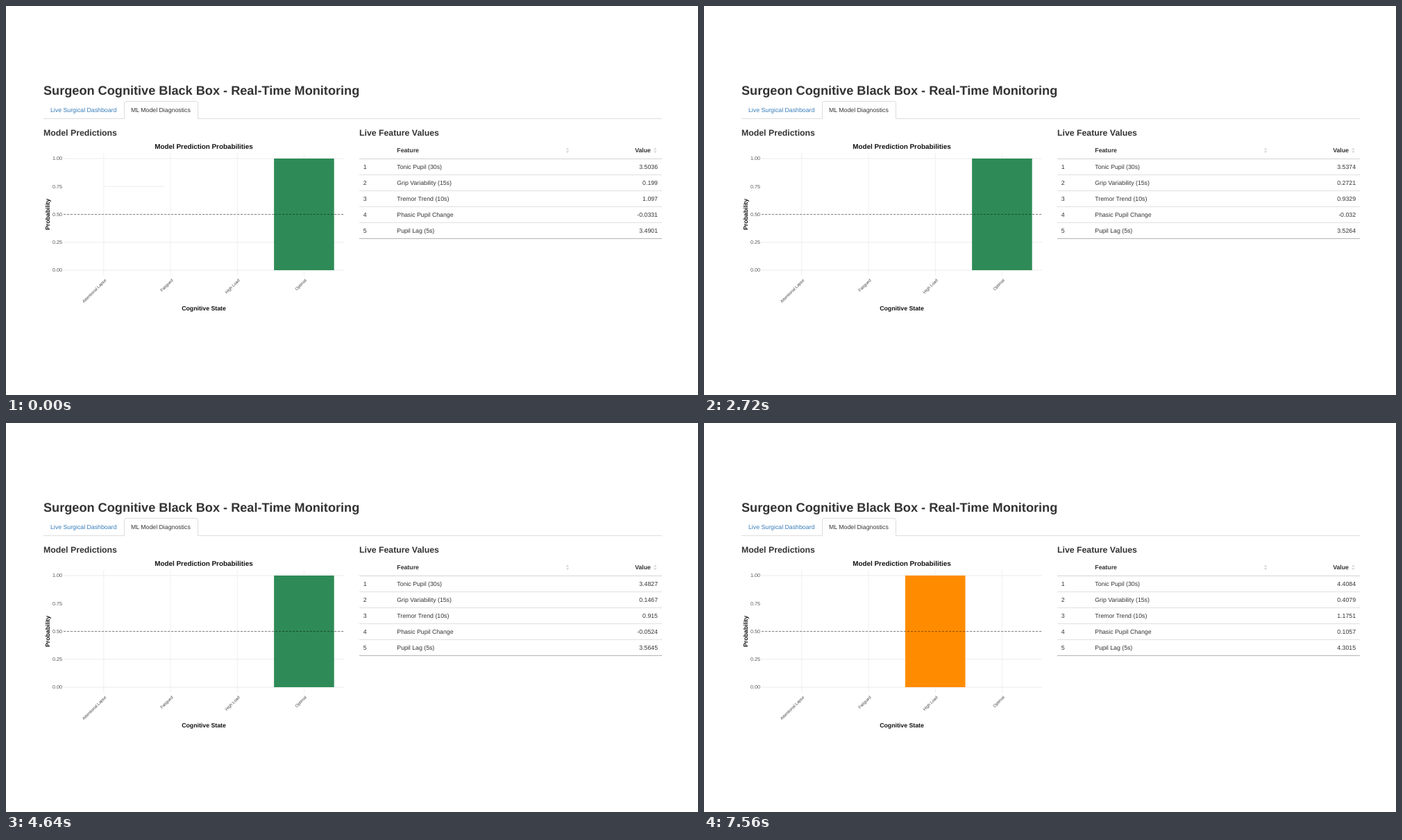
These frames come from a looping animation (997 by 561 pixels, 8000 ms). An HTML page:

```html
<!DOCTYPE html>
<html lang="en">
<head>
<meta charset="utf-8">
<title>Real-Time Monitoring</title>
<style>
  html, body { margin: 0; width: 100%; height: 100%; overflow: hidden; background: #fff; }
  svg { display: block; width: 997px; height: 561px; }
  text { font: 8.75px "Liberation Sans", Arial, sans-serif; fill: #333; text-rendering: geometricPrecision; }
  .title { font-size: 18.15px; font-weight: 700; }
  .section { font-size: 12.3px; font-weight: 700; }
  .chart-title { font-size: 9.9px; }
  .level { font-size: 7.2px; fill: #555; }
  .state { font-size: 5.95px; fill: #444; }
  .bold { font-weight: 700; }
  .black { fill: #111; }
  .link { fill: #337ab7; }
  .end { text-anchor: end; }
  .mid { text-anchor: middle; }
</style>
</head>
<body>
<svg id="stage" viewBox="0 0 997 561"></svg>
<script>
const stage = document.getElementById('stage');

function add(tag, attrs, content = '') {
  const el = document.createElementNS('http://www.w3.org/2000/svg', tag);
  for (const key in attrs) el.setAttribute(key, attrs[key]);
  el.textContent = content;
  return stage.appendChild(el);
}
const label = (x, y, content, cls = '', angle = 0) =>
  add('text', { x, y, class: cls, transform: `rotate(${angle} ${x} ${y})` }, content);
const hline = (x1, x2, y, stroke, extra = {}) =>
  add('line', { x1, x2, y1: y, y2: y, stroke, ...extra });
const vline = (x, y1, y2, stroke) => add('line', { x1: x, x2: x, y1, y2, stroke });

// Page frame
const PAGE = { left: 54, middle: 509, right: 945 };
label(PAGE.left, 127.5, 'Surgeon Cognitive Black Box - Real-Time Monitoring', 'title');
label(64, 153.3, 'Live Surgical Dashboard', 'link');
label(180, 153.3, 'ML Model Diagnostics');
add('path', {
  d: `M${PAGE.left} 162.5H170.5V140q0 -2.5 2.5 -2.5H274q2.5 0 2.5 2.5V162.5H${PAGE.right}`,
  fill: 'none', stroke: '#ddd'
});
label(PAGE.left, 187.3, 'Model Predictions', 'section');
label(PAGE.middle, 187.3, 'Live Feature Values', 'section');

// Chart
const plot = { left: 83, right: 487, top: 220, bottom: 381 };
const center = (plot.left + plot.right) / 2;
const height = plot.bottom - plot.top;
const gap = 96.2;
const stateX = i => 140.8 + i * gap;
const levelY = p => plot.bottom - p * height;

label(center, 206, 'Model Prediction Probabilities', 'chart-title bold black mid');
['Attentional Lapse', 'Fatigued', 'High Load', 'Optimal'].forEach((name, i) => {
  vline(stateX(i), plot.top - 8, plot.bottom + 8, '#f0f0f0');
  label(stateX(i) + 4, 396, name, 'state end', -45);
});
for (let p = 0; p <= 1; p += .25) {
  label(81, levelY(p) + 2.4, p.toFixed(2), 'level end');
  if (p !== .75) hline(plot.left, plot.right, levelY(p), '#ebebeb');
}
const partialGrid = hline(stateX(0), 228, levelY(.75), '#ebebeb');
label(center, 438.8, 'Cognitive State', 'bold black mid');
label(63, levelY(.5), 'Probability', 'bold black mid', -90);

const bar = add('rect', { y: plot.top, width: .9 * gap, height });
hline(plot.left, plot.right, levelY(.5), '#000',
  { 'stroke-width': .8, 'stroke-dasharray': '3.1 1.9', 'stroke-opacity': .55 });

// Feature table; unlisted readings lie midway between their neighbours
const features = {
  'Tonic Pupil (30s)': [3.5036, 3.5358, , 3.5374, 3.4698, , 3.4956, 3.6964, 4.4084],
  'Grip Variability (15s)': [.199, .2441, , .2721, .0701, , .2234, .2409, .4079],
  'Tremor Trend (10s)': [1.097, .9462, , .9329, .8741, , .956, 1.1282, 1.1751],
  'Phasic Pupil Change': [-.0331, -.0523, , -.032, -.119, , .0142, .423, .1057],
  'Pupil Lag (5s)': [3.4901, 3.5429, , 3.5264, 3.5819, , 3.5471, 3.6624, 4.3015]
};
const valueAt = (values, k) =>
  values[k] ?? +((values[k - 1] + values[k + 1]) / 2).toFixed(4);

const ROW = 23, HEAD = 220.5;
label(563.3, 211.2, 'Feature', 'bold');
label(929, 211.2, 'Value', 'bold end');
for (const x of [809, 935.3]) {
  add('path', { d: `M${x - 2.3} 207.5l2.3 -3.5l2.3 3.5zm0 1.5l2.3 3.5l2.3 -3.5z`, fill: '#dcdcdc' });
}
hline(PAGE.middle, PAGE.right, HEAD, '#d4d4d4');
const rows = Object.entries(features).map(([name, values], i, { length }) => {
  const bottom = HEAD + ROW * (i + 1), y = bottom - 8.4;
  label(514.8, y, i + 1);
  label(563.3, y, name);
  hline(PAGE.middle, PAGE.right, bottom, i === length - 1 ? '#b4b4b4' : '#e0e0e0');
  return { values, cell: label(939, y, '', 'end') };
});

// Readings arrive at a steady interval, shown on whole 40 ms ticks
const LOOP = 8000, TICK = 40, FIRST = 800, INTERVAL = 966, HIGH_LOAD_READING = 7;

function draw() {
  const t = performance.now() % LOOP;
  const tickEnd = Math.floor(t / TICK + 1) * TICK - 1;
  const reading = Math.floor((tickEnd - FIRST) / INTERVAL) + 1;
  const highLoad = reading >= HIGH_LOAD_READING;

  for (const { values, cell } of rows) cell.textContent = valueAt(values, reading);
  bar.setAttribute('x', stateX(highLoad ? 2 : 3) - .45 * gap);
  bar.setAttribute('fill', highLoad ? '#ff8c00' : '#2e8b57');
  partialGrid.setAttribute('visibility', t < 1360 ? 'visible' : 'hidden');
  requestAnimationFrame(draw);
}
draw();
</script>
</body>
</html>
```
